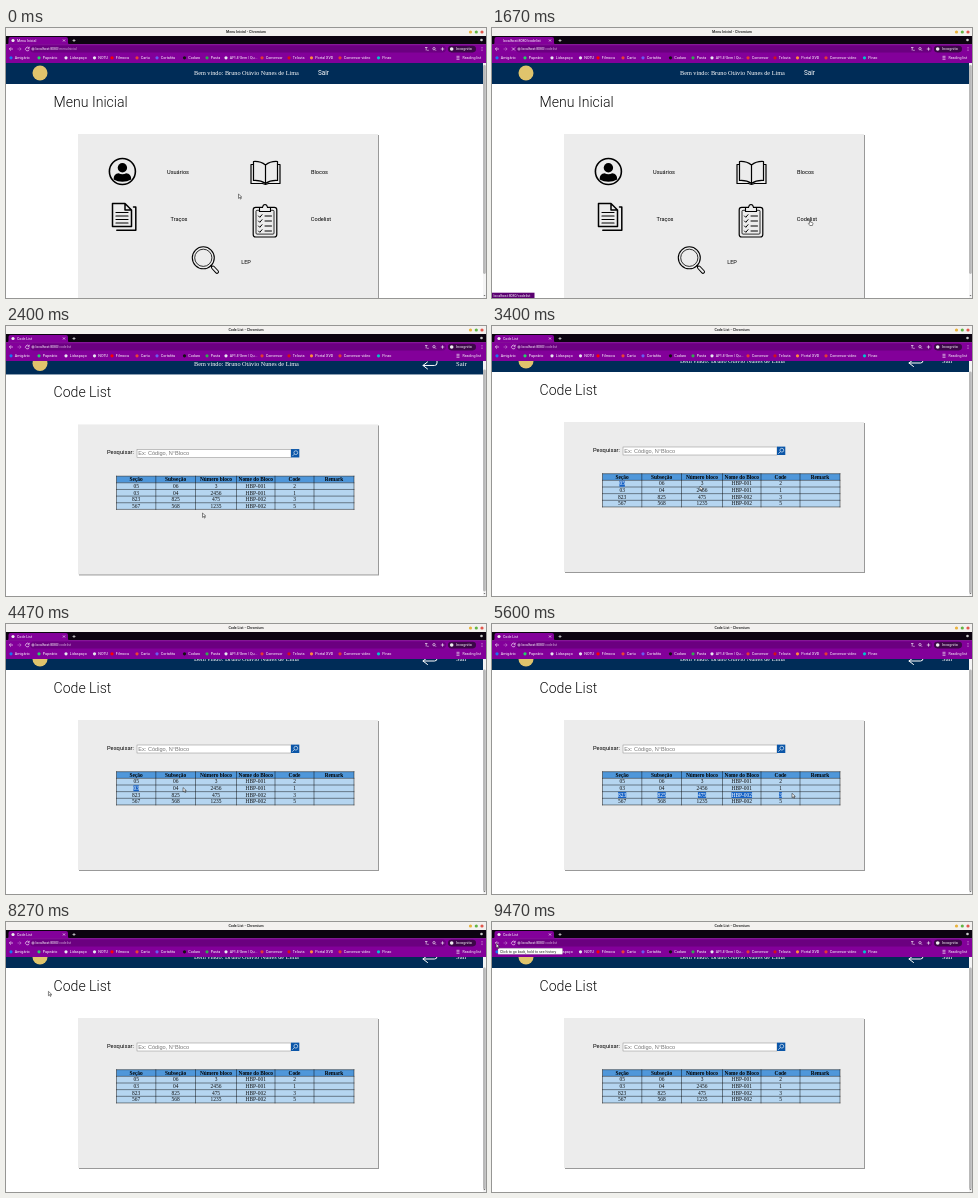
An HTML page that plays this animation: 480 by 270 pixels, repeating every 9.87 s.

```html
<!DOCTYPE html>
<html lang="pt">
<head>
<meta charset="utf-8">
<title>Menu Inicial</title>
<style>
html, body { margin: 0; width: 100%; height: 100%; overflow: hidden; background: #fff; }
svg { display: block; width: 480px; height: 270px; font-family: Roboto, sans-serif; }
.serif { font-family: "Liberation Serif", serif; }
.line { fill: none; stroke: #000; stroke-linejoin: round; stroke-linecap: round; }
.tool { fill: none; stroke: #fff; stroke-width: .6; }
.panel { fill: #ececec; filter: drop-shadow(1px 1px .5px #0006); }
</style>
</head>
<body>
<svg id="stage" viewBox="0 0 480 270"></svg>
<script>
const LOOP = 9870, CLICK = 1470, LOADED = 1700;
const stage = document.getElementById('stage');
const $ = id => document.getElementById(id);

const text = (x, y, size, str, attrs = '') =>
  `<text x="${x}" y="${y}" font-size="${size}" ${attrs}>${str}</text>`;
const rect = (x, y, w, h, fill, attrs = '') =>
  `<rect x="${x}" y="${y}" width="${w}" height="${h}" fill="${fill}" ${attrs}/>`;
const dot = (x, y, r, fill, attrs = '') =>
  `<circle cx="${x}" cy="${y}" r="${r}" fill="${fill}" ${attrs}/>`;
const path = (d, attrs = '') => `<path d="${d}" ${attrs}/>`;
const line = (d, width, color = '#000') =>
  path(d, `class="line" stroke-width="${width}" style="stroke:${color}"`);
const ring = (x, y, r, width) => dot(x, y, r, 'none', `stroke="#000" stroke-width="${width}"`);
const mid = 'text-anchor="middle"';

// Page parts
const header = exit =>
  rect(0, 35, 477, 21, '#002c57') + dot(34, 45, 7.5, '#e0c46c') +
  text(188, 47.2, 6.26, 'Bem vindo: Bruno Otávio Nunes de Lima', 'class="serif" fill="#fff"') + exit;
const title = str => text(47.5, 78.5, 14.1, str, 'font-weight="300" fill="#111"');

const userIcon = ring(116.4, 143.5, 13, 1.6) + dot(116.4, 139.8, 4.7, '#000') +
  path('M107.6 151.5q0-6 5-6.2 3.8 2 7.6 0 5 .2 5 6.2-4 2.2-8.8 2.2t-8.8-2.2z');
const bookIcon =
  line('M259.5 137q-5-4-12-3.5v19q7-.5 12 3 5-3.5 12-3v-19q-7-.5-12 3.500zv18.5', 1.2) +
  line('M247 136.5h-2v19h11.500l3 1 3-1H274v-19h-2', 1.2);
const docsIcon =
  line('M106.500 175.500H119l6.500 6.500v16.500h-19zM119 176v6h6', 1.5) +
  line('M127.500 179h2.300v23.300h-19', 1.5) +
  line([184.5, 188, 191.5, 195].map(y => `M110 ${y}h12`).join(''), 1.2);
const clipIcon =
  rect(247.2, 179.3, 23.6, 29.7, 'none', 'rx="2.5" stroke="#000" stroke-width="1.2"') +
  rect(250, 182.3, 18, 23.8, 'none', 'rx="1" stroke="#000" stroke-width=".8"') +
  path('M253.5 183.500v-4h3q.5-3 2.500-3t2.500 3h3v4z', 'fill="#ececec" stroke="#000" stroke-width="1.1"') +
  [188, 193, 198, 203].map(y => line(`M252.5 ${y}l1.3 1.3 2.2-2.600M259 ${y}h6.500`, 1)).join('');
const lensIcon = ring(197.3, 229.8, 11, 1.1) + ring(197.3, 229.8, 8.6, .8) +
  line('M205 237.500l1.500 1.500', 1.6) +
  line('M207 239.500l4 4.300', 4) + line('M207 239.500l4 4.300', 2, '#ececec');

const labels = [[172, 145.5, 'Usuários'], [313.5, 145.5, 'Blocos'], [173, 193.2, 'Traços'],
  [315, 193.2, 'Codelist'], [240, 235.7, 'LEP']];
const menuPage = header(text(312, 47.2, 6.4, 'Sair', 'fill="#fff"')) + title('Menu Inicial') +
  rect(72, 106, 300, 200, '', 'class="panel"') +
  userIcon + bookIcon + docsIcon + clipIcon + lensIcon +
  labels.map(([x, y, s]) => text(x, y, 5.6, s, mid)).join('');

// Table
const edges = [110.5, 149.8, 189.5, 230.5, 269, 308, 348];
const centre = c => (edges[c] + edges[c + 1]) / 2;
const top0 = 157.7, rowH = 6.65;
const heads = ['Seção', 'Subseção', 'Número bloco', 'Nome do Bloco', 'Code', 'Remark'];
const rows = [
  ['05', '06', '3', 'HBP-001', '2'],
  ['03', '04', '2456', 'HBP-001', '1'],
  ['823', '825', '475', 'HBP-002', '3'],
  ['567', '568', '1235', 'HBP-002', '5']
];
const rowY = r => top0 + rowH * (r + 1);
const grid = edges.map(x => `M${x} ${top0}V${rowY(4)}`).join('') +
  [-1, 0, 1, 2, 3, 4].map(r => `M110.5 ${rowY(r)}H348`).join('');
const table = rect(110.5, top0, 237.5, rowH, '#4f97da') + rect(110.5, rowY(0), 237.5, rowH * 4, '#b5d5f0') +
  line(grid, .45) + '<g id="marks"></g><g class="serif">' +
  heads.map((s, c) => text(centre(c), top0 + 5.1, 5.35, s, mid + ' font-weight="bold"')).join('') +
  rows.map((row, r) => row.map((s, c) =>
    text(centre(c), rowY(r) + 5.1, 5.45, s, `${mid} id="cell${r}${c}"`)).join('')).join('') + '</g>';

const codePage = header(
    line('M421.500 43.500l-4.500 3.500 4.500 3.500M417 47H428.500q2.500 0 2.500-2.500V41', 1, '#fff') +
    text(450, 47.2, 6.6, 'Sair', 'class="serif" fill="#fff"')) +
  title('Code List') + rect(72, 106, 300, 150, '', 'class="panel"') +
  text(101, 135.7, 5.75, 'Pesquisar:') +
  rect(131, 131, 154, 8, '#fff', 'stroke="#888" stroke-width=".5"') +
  text(132.3, 137, 5.6, 'Ex: Código, N°Bloco', 'font-family="Liberation Sans, sans-serif" fill="#757575"') +
  rect(285, 130.6, 8.3, 8.4, '#0b56a8') +
  dot(289.8, 134.2, 1.9, 'none', 'class="tool"') + path('M288.3 135.7l-2 2', 'class="tool"') + table;

// Browser window
const bookmarks = [[5, '#1877f2', 'Amigário'], [33, '#25d366', 'Papeário'], [60, '#e8e8f0', 'Lidaspaço'],
  [88.5, '#e8e8f0', 'NOTU'], [106, '#f00', 'Filmoca'], [131, '#ea4335', 'Cartu'], [151, '#6a5cf0', 'Cortafita'],
  [178.5, '#111', 'Codaro'], [201, '#34a853', 'Pasta'], [220, '#e8e8f0', 'API 4°Sem | Qu...'],
  [256, '#e53935', 'Conversor'], [283, '#d50f1a', 'Telovia'], [305.5, '#ff8a3c', 'Portal XVD'],
  [334, '#e53935', 'Conversor video'], [372.5, '#00c4cc', 'Pinzo']];
const white = 'fill="#fff"';
const frame = rect(0, 0, 480, 8, '#f3f1ef') +
  text(240, 5.3, 3.6, '', `${mid} id="winTitle" font-weight="bold" fill="#333"`) +
  dot(464.5, 4, 1.6, '#e9b23c') + dot(470.3, 4, 1.6, '#62b543') + dot(476, 4, 1.6, '#e2574c') +
  rect(0, 8, 480, 8.5, '#0c0310') + dot(475.5, 12, 1.3, '#ccc') +
  path('M1 16.5q1.5 0 1.5-2V11q0-2 2-2H60q2 0 2 2v3.5q0 2 1.5 2z', 'fill="#83009a"') +
  rect(0, 16.2, 480, 18.8, '#83009a') + rect(24, 17.6, 416, 7, '#6b0080', 'rx="3.5"') +
  dot(7, 12.5, 1.6, '#eee', 'id="favicon"') +
  text(11, 13.7, 3.6, '', `id="tabTitle" ${white}`) +
  path('M57 11.5l2 2m0-2l-2 2M66.5 12.5h3m-1.5-1.5v3', 'class="tool"') +
  path('M7 21H3.5m1.5-1.7L3.3 21 5 22.7', 'class="tool"') +
  path('M11.5 21H15m-1.5-1.7L15.2 21l-1.7 1.7', 'class="tool" opacity=".5"') +
  path('M22.8 20a1.8 1.8 0 1 0 .3 1.5M23.2 18.8v1.5h-1.5', 'id="reload" class="tool"') +
  path('M20 19.5l3 3m0-3l-3 3', 'id="stop" class="tool"') +
  dot(27, 21, 1.1, 'none', 'class="tool"') +
  text(29.5, 22.2, 3.4, `localhost:8080<tspan id="urlPath" fill="#d0a5d8"></tspan>`, white) +
  path('M419 19.5h2.5m-1.3 0v3m1-.2h1.5M434.8 21h3.4m-1.7-1.7v3.4', 'class="tool"') +
  dot(428, 20.7, 1.2, 'none', 'class="tool"') + path('M429 21.7l1 1', 'class="tool"') +
  rect(442, 17.8, 28, 6.6, '#3c0748', 'rx="3.3"') + dot(445.7, 21, 1.8, '#eee') +
  text(450, 22.3, 3.8, 'Incognito', white) +
  [19.5, 21, 22.5].map(y => dot(476, y, .45, '#fff')).join('') +
  bookmarks.map(([x, c, s]) => dot(x, 29.8, 1.6, c) + text(x + 3.8, 31, 3.7, s, white)).join('') +
  path('M450.5 28.3h3m-3 1.5h3m-3 1.5h3', 'class="tool"') +
  text(456.5, 31, 3.6, 'Reading list', white);

const scrollbar = rect(477, 35, 3, 235, '#f4f4f4') +
  rect(477, 37, 2.8, 209, '#b9b9b9', 'id="thumb" rx="1.4"') +
  path('M477.5 267h2l-1 1.3z', 'fill="#666"');

const overlays = '<g id="status">' + rect(0, 264.7, 42.5, 5.3, '#5a0070') +
  text(1.5, 268.5, 3.5, 'localhost:8080/codelist', white) + '</g><g id="tip">' +
  rect(6, 26.3, 64.5, 6, '#fff', 'rx=".6" stroke="#999" stroke-width=".3"') +
  text(8, 30.6, 3.6, 'Click to go back, hold to see history', 'fill="#222"') + '</g>' +
  '<g id="cursor" fill="#fff" stroke="#111" stroke-width=".5" stroke-linejoin="round">' +
  path('M0 0v4.4l1.1-1 .8 1.7.8-.4-.8-1.6h1.4z', 'id="arrow"') +
  path('M0 .2q.5-.6 1 0v1.9l2 .5q.6.3.4 1.2l-.5 1.7H.3L-1.1 3.5q.3-.8 1.1-.1z', 'id="hand"') + '</g>';

stage.innerHTML = `<g id="menu">${menuPage}</g><g id="code">${codePage}</g>` + scrollbar + frame + overlays;

// Pointer track: time, x, y
const track = [[70, 232.5, 166], [800, 317.5, 192], [1670, 317.5, 192], [2070, 196.5, 187], [2500, 196.5, 187],
  [3200, 128, 156], [3330, 128, 156], [3400, 208, 160], [3700, 300, 158], [4000, 300, 158], [4270, 128, 163],
  [4330, 128, 163], [4730, 300, 165], [4930, 310, 167], [5070, 310, 167], [5300, 128, 169], [5500, 300, 169],
  [6000, 300, 172], [6300, 128, 176], [6700, 296, 178], [7000, 133, 192], [7670, 133, 192], [8600, 6, 20],
  [8800, 4.2, 21.5]];
// Row drags: start, end of drag, cleared
const drags = [[3330, 3800, 4270], [4330, 4800, 5070], [5300, 5600, 6200], [6300, 6770, 7270]];
const LAG = 70;

function pointer(t) {
  const i = track.findIndex(k => k[0] > t);
  if (i === 0) return track[0].slice(1);
  if (i < 0) return track[track.length - 1].slice(1);
  const [t0, x0, y0] = track[i - 1], [t1, x1, y1] = track[i];
  const p = (t - t0) / (t1 - t0), e = p * p * (3 - 2 * p);
  return [x0 + (x1 - x0) * e, y0 + (y1 - y0) * e];
}

const show = (id, on) => $(id).setAttribute('display', on ? 'inline' : 'none');

function select(t) {
  let marks = '';
  rows.forEach((row, r) => row.forEach((s, c) => {
    const [start, end, clear] = drags[r], cell = $('cell' + r + c);
    const on = t >= start && t < clear && pointer(Math.max(start, Math.min(t, end) - LAG))[0] > centre(c) - 4;
    cell.setAttribute('fill', on ? '#fff' : '#111');
    if (!on) return;
    const w = cell.getComputedTextLength();
    marks += rect(centre(c) - w / 2, rowY(r) + .3, w, rowH - .6, '#1763c6');
  }));
  $('marks').innerHTML = marks;
}

function draw(now) {
  const t = now % LOOP, loaded = t >= LOADED, clicked = t >= CLICK, loading = clicked && !loaded;
  const name = loaded ? 'Code List' : 'Menu Inicial';
  const rest = 1 - Math.min(1, Math.max(0, (t - 2290) / 220));
  const scroll = 10 * (1 - rest * rest);
  const [x, y] = pointer(t), hover = t > 700 && !loaded;

  show('menu', !loaded);
  show('code', loaded);
  $('code').setAttribute('transform', `translate(0 ${-scroll})`);
  $('thumb').setAttribute('y', 37 + (loaded ? scroll * .85 : 0));
  $('thumb').setAttribute('height', loaded ? 222 : 209);
  $('winTitle').textContent = name + ' - Chromium';
  $('tabTitle').textContent = loading ? 'localhost:8080/codelist' : name;
  $('urlPath').textContent = clicked ? '/codelist' : '/menuInicial';
  show('favicon', !loading);
  show('reload', !loading);
  show('stop', loading);
  show('status', hover);
  show('tip', t >= 9330);
  show('hand', hover);
  show('arrow', !hover);
  $('cursor').setAttribute('transform', `translate(${x} ${y})`);
  if (loaded) select(t);
  requestAnimationFrame(() => draw(performance.now() - begin));
}
const begin = performance.now();
draw(0);
</script>
</body>
</html>
```
